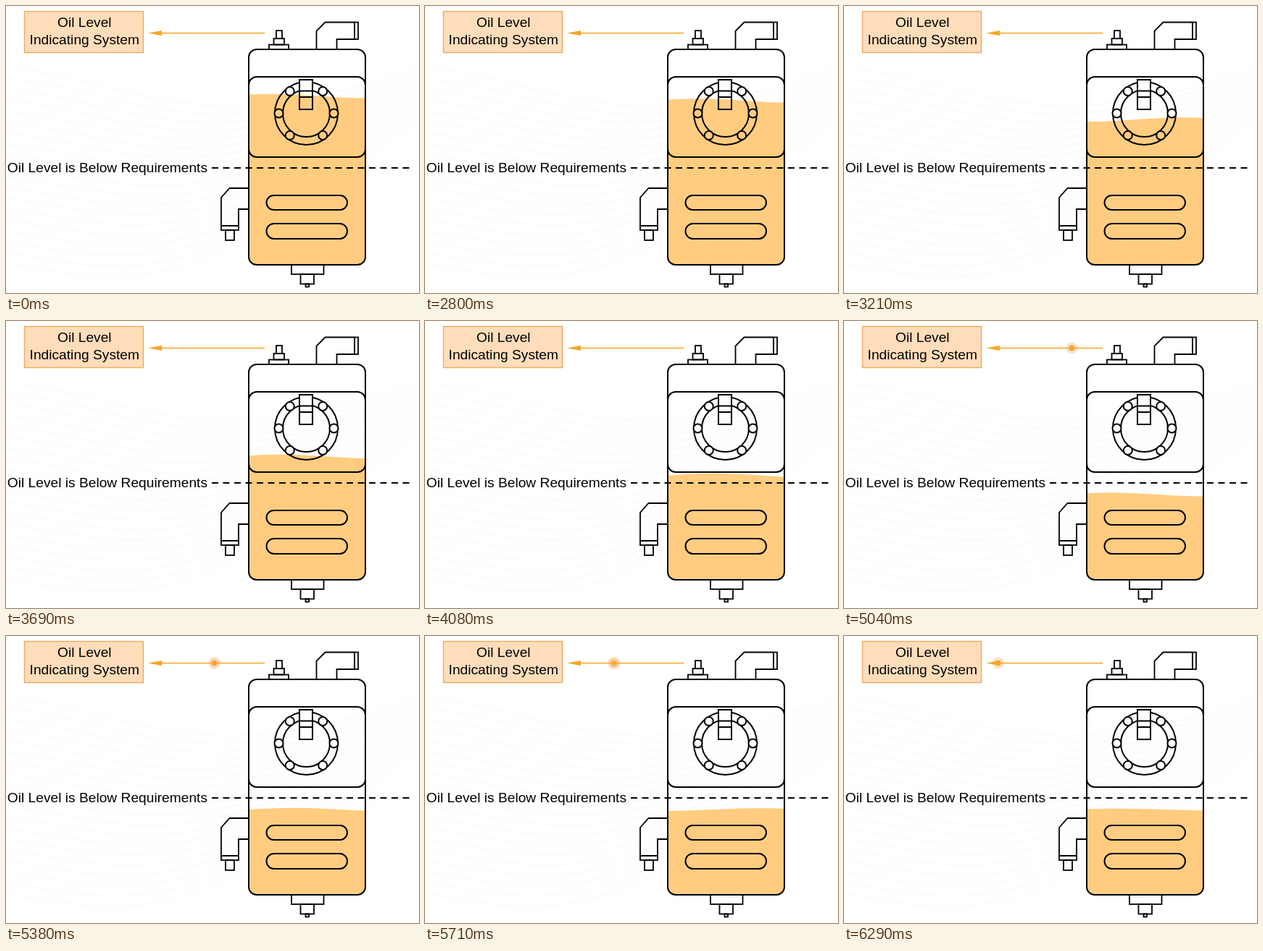
Write an HTML page with a canvas that moves like this. It is 570x397 px and loops after 6370 ms.

```html
<!DOCTYPE html>
<html lang="en">
<head>
<meta charset="utf-8">
<title>Oil level</title>
<style>
html, body { margin: 0; width: 100%; height: 100%; overflow: hidden; background: #fff; }
canvas { display: block; }
</style>
</head>
<body>
<canvas id="stage" width="570" height="397"></canvas>
<script>
const ctx = document.getElementById('stage').getContext('2d');
const LOOP = 6370, START = 2800, STEP = 3490 / 52, HOLD = 2700;
const OIL = '#ffcc80', ORANGE = '#f5a623', INK = '#000';
const FONT = '19.2px "Liberation Sans", Arial, sans-serif';
const LEFT = 335, RIGHT = 496, FULL = 131, LOW = 240;
const HUB = { x: 414.5, y: 148.5 };

const bolts = [];
for (const side of [-1, 1]) {
  for (const k of [-1, 0, 1]) {
    bolts.push([HUB.x + side * 38 * Math.cos(k * 0.93), HUB.y + 38 * Math.sin(k * 0.93)]);
  }
}

// The picture rests at first, then moves in even steps.
function stepTime(t) {
  return t < START ? HOLD : START + Math.floor((t - START) / STEP + 0.001) * STEP;
}

function line(points) {
  ctx.beginPath();
  points.forEach(([x, y]) => ctx.lineTo(x, y));
  ctx.stroke();
}

function box(x1, y1, x2, y2) {
  ctx.strokeRect(x1, y1, x2 - x1, y2 - y1);
}

function roundPath(x1, y1, x2, y2, r) {
  ctx.beginPath();
  ctx.roundRect(x1, y1, x2 - x1, y2 - y1, r);
}

function roundBox(...args) {
  roundPath(...args);
  ctx.stroke();
}

function circle(x, y, r, fill) {
  ctx.beginPath();
  ctx.arc(x, y, r, 0, 2 * Math.PI);
  if (fill) {
    ctx.fillStyle = fill;
    ctx.fill();
  } else ctx.stroke();
}

function backdrop() {
  ctx.strokeStyle = '#f9f9f9';
  ctx.lineWidth = 1;
  for (let i = 0; i < 19; i++) {
    ctx.beginPath();
    ctx.moveTo(0, 86 + 15 * i);
    ctx.bezierCurveTo(160, 95 + 16 * i, 260, 200 + 12 * i, 570, 83 + 4 * i);
    ctx.stroke();
  }
}

function oil(t) {
  const s = (t - START) / 1000;
  const mid = Math.min(LOW, FULL + 64.8 * s);
  const tilt = Math.cos(Math.PI * (0.25 + 1.75 * s - 0.05 * s * s));
  const crest = 0.5 - 0.32 * tilt;
  const swell = Math.min(2.8, 4.7 - s);
  ctx.save();
  roundPath(LEFT, 60, RIGHT, 358, 11);
  ctx.clip();
  ctx.beginPath();
  for (let x = LEFT; x <= RIGHT; x++) {
    const u = (x - LEFT) / (RIGHT - LEFT);
    ctx.lineTo(x, mid - swell * Math.cos(2 * Math.PI * (u - crest) / 1.6));
  }
  ctx.lineTo(RIGHT, 360);
  ctx.lineTo(LEFT, 360);
  ctx.fillStyle = OIL;
  ctx.fill();
  ctx.restore();
}

function flange() {
  // Rings stay hidden behind the bolts and the gauge.
  ctx.save();
  ctx.beginPath();
  ctx.rect(0, 0, 570, 397);
  ctx.rect(405, 102, 18, 41);
  for (const [x, y] of bolts) {
    ctx.moveTo(x + 6, y);
    ctx.arc(x, y, 6, 0, 2 * Math.PI);
  }
  ctx.clip('evenodd');
  circle(HUB.x, HUB.y, 43.5);
  circle(HUB.x, HUB.y, 32.5);
  ctx.restore();
  for (const [x, y] of bolts) circle(x, y, 6);
  box(405, 102, 423, 143);
  box(405, 117.5, 423, 126);
}

function tank() {
  ctx.strokeStyle = INK;
  ctx.lineWidth = 2;
  roundBox(LEFT, 60, RIGHT, 358, 11);
  roundBox(LEFT, 98, RIGHT, 209, 11);
  roundBox(359.5, 262, 471, 282, 10);
  roundBox(359.5, 301, 471, 322, 10.5);
  flange();

  ctx.lineWidth = 1.8;
  // sensor
  box(373, 34, 381, 45);
  box(369.5, 45, 384, 53.5);
  box(363, 53.5, 390, 60);
  // outlet
  line([[428.5, 60], [428.5, 34.5], [440.5, 22.5], [481, 22.5]]);
  line([[456.5, 60], [456.5, 46], [481, 46]]);
  box(481, 22.5, 486, 46);
  // side pipe
  line([[335, 252], [308.5, 252], [297, 265], [297, 304], [321, 304], [321, 281], [335, 281]]);
  box(297, 304, 321, 310);
  box(303, 310, 315, 324);
  // drain
  box(394, 358, 438.5, 371);
  box(406.5, 371, 425, 384.5);
  box(413.5, 384.5, 418, 388.5);
}

function labels() {
  ctx.fillStyle = '#ffddbb';
  ctx.fillRect(25, 7, 165, 58);
  ctx.strokeStyle = '#edab5c';
  ctx.lineWidth = 1.4;
  box(25.5, 7.5, 189.5, 64.5);

  ctx.fillStyle = INK;
  ctx.font = FONT;
  ctx.textAlign = 'center';
  ctx.fillText('Oil Level', 108.3, 29);
  ctx.fillText('Indicating System', 108.3, 53);
  ctx.textAlign = 'left';
  ctx.fillText('Oil Level is Below Requirements', 1.8, 230);

  ctx.strokeStyle = INK;
  ctx.lineWidth = 1.8;
  ctx.setLineDash([9, 6.5]);
  line([[284, 224], [557, 224]]);
  ctx.setLineDash([]);
}

function arrow() {
  ctx.strokeStyle = ctx.fillStyle = ORANGE;
  ctx.lineWidth = 1.4;
  line([[210, 37.5], [357, 37.5]]);
  ctx.beginPath();
  ctx.moveTo(196, 37.5);
  ctx.lineTo(215, 34);
  ctx.lineTo(215, 41);
  ctx.fill();
}

// A pulsing dot leaves the sensor once the oil is low.
function signal(t) {
  const age = t - 4479;
  if (age < 0) return;
  const x = 357 - 0.0797 * age;
  const pulse = (1 - Math.cos((age - 536) / 670 * Math.PI)) / 2;
  circle(x, 37.5, 8 + pulse, 'rgba(245,150,70,0.28)');
  circle(x, 37.5, 4 + 2 * pulse, 'rgba(245,160,60,0.45)');
  circle(x, 37.5, 3.8 - pulse, '#f7a035');
}

function draw(now) {
  const t = stepTime(now % LOOP);
  ctx.fillStyle = '#fff';
  ctx.fillRect(0, 0, 570, 397);
  backdrop();
  oil(t);
  tank();
  labels();
  signal(t);
  arrow();
}

let origin;
function tick(now) {
  origin ??= now;
  draw(now - origin);
  requestAnimationFrame(tick);
}
draw(0);
requestAnimationFrame(tick);
</script>
</body>
</html>
```
